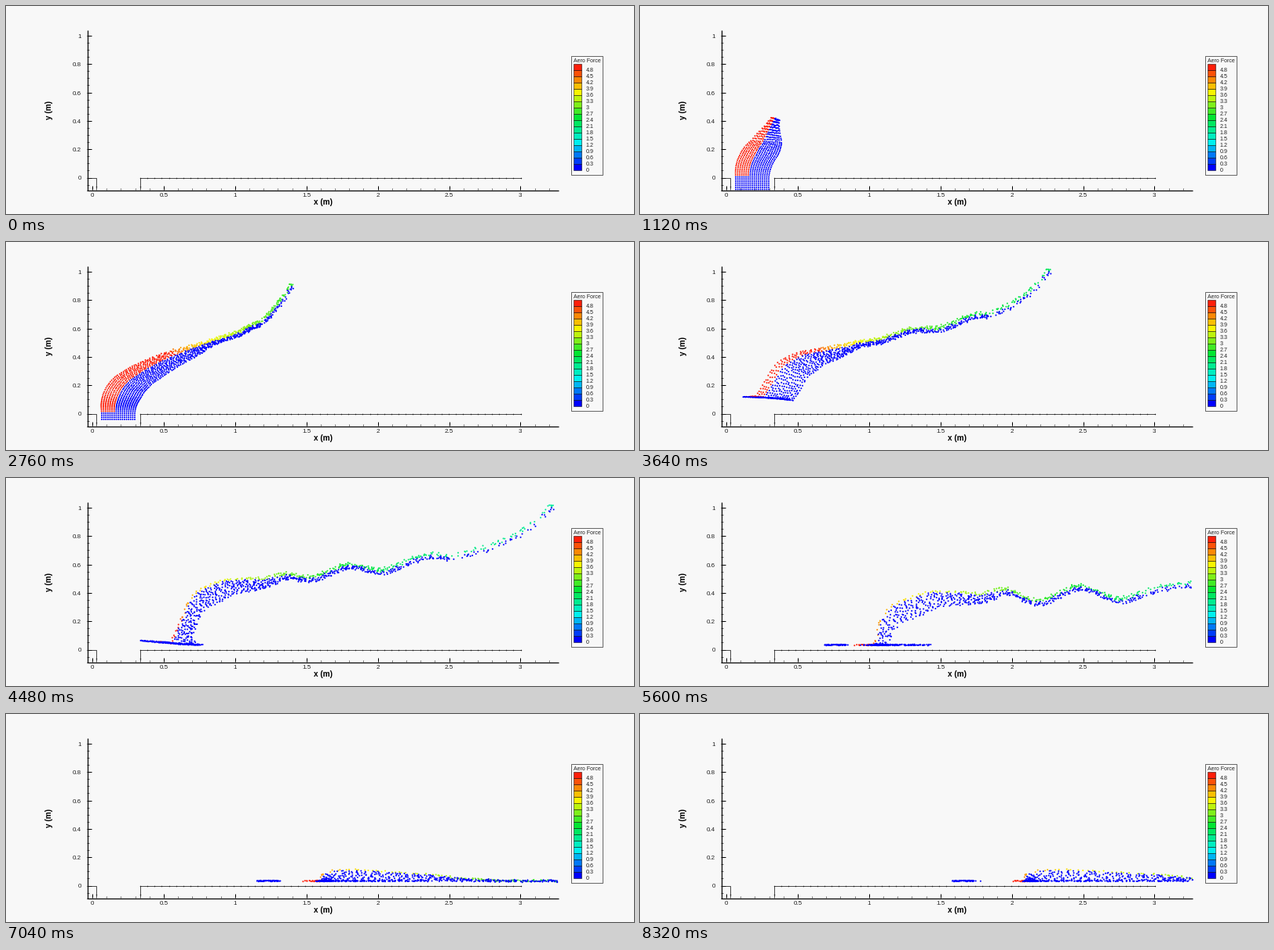
Animation, 800 px wide and 266 px high, one loop 8360 ms. Source, as a matplotlib script:

```python
import numpy as np
import matplotlib.pyplot as plt
from matplotlib.animation import FuncAnimation
from matplotlib.collections import LineCollection
from matplotlib.colors import LinearSegmentedColormap
from matplotlib.patches import Rectangle

W, H, DPI = 800, 266, 100
STEP, FRAMES = 40, 209
PX = 72 / DPI
plt.rcParams["font.family"] = "Liberation Sans"

fig = plt.figure(figsize=(W / DPI, H / DPI), dpi=DPI, facecolor="#f8f8f8")
ax = fig.add_axes([0, 0, 1, 1])
ax.set_xlim(0, W)
ax.set_ylim(H, 0)
ax.axis("off")

cmap = LinearSegmentedColormap.from_list(
    "force", ["#0000ff", "#00f0f0", "#00e632", "#f8f800", "#ff1e0a"])


# ---- plot furniture, in pixels ----
def sx(x):
    return 110 + 181.8 * x


def sy(y):
    return 219.5 - 181.6 * y


def lines(segs, width, color="black"):
    ax.add_collection(LineCollection(segs, linewidths=width * PX, colors=color))


def label(x, y, text, size, **kw):
    kw = {"ha": "center", "va": "center_baseline", "color": "#222222", **kw}
    ax.text(x, y, text, fontsize=size * PX, **kw)


def draw_axes():
    lines([[(103.5, 31), (103.5, 236)], [(103, 235.5), (704, 235.5)]], 1.2)
    major, minor = [], []
    for i in range(33):
        x = sx(i / 10)
        big = i % 5 == 0
        (major if big else minor).append([(x, 235), (x, 230 if big else 232.5)])
        if big:
            label(x, 242, f"{i / 10:g}", 8)
    for i in range(-1, 21):
        y = sy(i / 20)
        big = i % 4 == 0
        (major if big else minor).append([(103, y), (109 if big else 106, y)])
        if big:
            label(96, y + .5, f"{i / 20:g}", 8, ha="right")
    lines(major, 1)
    lines(minor, 0.6)
    label(404, 250.5, "x (m)", 10, weight="bold", color="black")
    label(55, 133, "y (m)", 10, weight="bold", color="black",
          rotation=90, va="center")


def draw_walls():
    lines([[(104, 219.5), (115, 219.5), (115, 235)],
           [(170.5, 235), (170.5, 219.5), (655.5, 219.5)]], 0.8, "#222222")
    xs = np.append(np.linspace(171, 655.5, 54), [115, 170.5])
    ys = np.append(np.full(54, 219.8), [230.5, 230.5])
    ax.scatter(xs, ys, s=(1.5 * PX) ** 2, c="black", lw=0)


def draw_legend():
    ax.add_patch(Rectangle((719.5, 63.5), 40, 152, fc="none", ec="#444444",
                           lw=0.8 * PX))
    label(723, 70, "Aero Force", 7, ha="left")
    for k in range(17):
        y = 209.5 - 8 * k
        ax.add_patch(Rectangle((723, y - 8), 10, 8, fc=cmap(k / 16),
                               ec="black", lw=0.5 * PX))
        label(738.5, y + .5, f"{0.3 * k:.2g}", 7.2, ha="left")


draw_axes()
draw_walls()
draw_legend()


# ---- the jet: ballistic droplets carried by a cross wind ----
COLS, ROWS = 17, 90
SPEED = 0.09        # column speed, px per ms
GRAVITY = 1.25e-5   # half the fall, px per ms^2
RELAX = 200

# u runs from 0 at the jet's tail to 1 at its tip, r from windward to lee
u, r = (g.ravel() for g in np.meshgrid(np.linspace(0, 1, ROWS),
                                       np.linspace(0, 1, COLS)))
n = u.size
rng = np.random.default_rng(4)
slip = rng.uniform(-.5, .5, n) / ROWS
jitter = rng.uniform(-1, 1, (2, n))
lifetime = rng.random(n)
floor = 6 + rng.uniform(-.6, .6, n)


def ramp(x, lo, hi):
    return np.clip((x - lo) / (hi - lo), 0, 1)


def by_label(*keys):
    us, values = zip(*keys)
    return lambda q: np.interp(q, us, values)


drift = by_label((.03, .064), (.035, .08), (.2, .07), (.35, .095),
                 (.63, .114), (.8, .125), (.9, .16), (1, .3))
delay = by_label((.05, 1500), (.2, 1000), (.8, 1000), (.9, 1700), (1, 4000))
lift = by_label((.1, .018), (.22, .053), (.3, .061), (.63, .07),
                (.9, .078), (1, .097))
depth = by_label((0, 4), (.1, 10), (.25, 26), (.4, 14), (.5, 9), (1, 8))


def exit_time(q):
    return 230 + (1 - q) * 235 / SPEED


def positions(t):
    q = u + slip * ramp(t - exit_time(u), 0, 2000)
    raw = t - exit_time(q)
    a = np.maximum(raw, 0)
    strand = ramp(q, .38, .48)

    # centreline
    b, v = delay(q), lift(q)
    x = 143 + drift(q) * (np.hypot(a, b) - b)
    h = v * a - GRAVITY * a * a + (SPEED - v) * RELAX * (1 - np.exp(-a / RELAX))
    h += 9 * strand * ramp(a, 1800, 4300) * np.cos(10 * np.pi * (q - .66))

    # section: a wide column that pinches into a thin sheet
    pinch = np.minimum(600 + 2500 * (1 - q), 1600)
    wide = 1 / (1 + np.exp((a - pinch) / 180))
    thin = np.where(u < .032, 26, 15 - 12 * strand)
    x += (r - .5) * (thin + (42 + 7 * ramp(a, 0, 400) - thin) * wide)
    h -= (r - .5) * depth(q) * a * a / (a * a + 1e6)

    # landing: a low pile, with the foot smeared along the wall
    pile = 15 * (1 - r) * ramp(q, .17, .22) * ramp(q, .5, .25)
    ground = floor + pile
    landed = 2 * np.logaddexp(h / 2, ground / 2)
    h += (landed - h) * ramp(a, 500, 1300)
    x += r * .046 * np.maximum(a - 1350, 0) * (u > .032) * ramp(q, .14, .09)

    loose = ramp(a, 0, 2500)
    x += jitter[0] * loose
    h += jitter[1] * loose * (.4 + .8 * strand)
    return x, 219.5 - h - SPEED * np.minimum(raw, 0), a


def force(t, y):
    shift = np.interp(t, [1120, 2760, 4480], [1, .42, 0])
    drop = 3.2 * np.sqrt(ramp(u - shift, .15, 1))
    body = ramp(u, .45, .35)
    band = .4 + .15 * ramp(u, .6, 1) * ramp(t, 1120, 2760)
    band -= .32 * body * ramp(t, 2760, 4480)
    hit = (r < band) & (y < 217.5) & ((u > .032) | (t < 3400))
    return np.where(hit, 5 - drop, 0)


dots = ax.scatter([], [], s=(2 * PX) ** 2, linewidths=0, zorder=3)


def draw(frame):
    t = frame * STEP
    x, y, age = positions(t)
    worn = .4 * ramp(age, 1300, 2800) * ramp(u, .3, .4)
    show = (x < 704) & (y > 31) & (y < 236.5) & (lifetime >= worn)
    dots.set_offsets(np.column_stack([x, y])[show])
    dots.set_facecolors(cmap(force(t, y)[show] / 5))
    return dots,


anim = FuncAnimation(fig, draw, frames=FRAMES, interval=STEP, repeat=True,
                     repeat_delay=0, blit=False)
plt.show()
```
